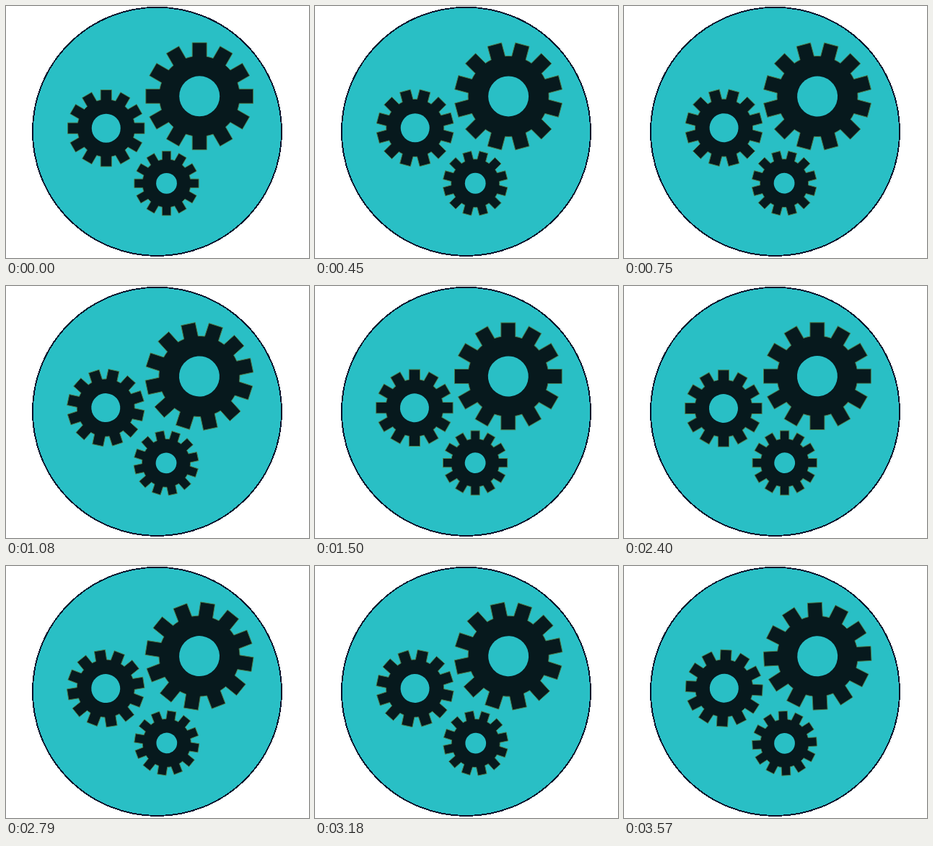
Write an HTML page that moves like this. It is 420 by 350 pixels and loops after 3.6 s.

```html
<!DOCTYPE html>
<html lang="en">
<head>
<meta charset="utf-8">
<title>Turning gears</title>
<style>
  html, body { margin: 0; width: 100%; height: 100%; overflow: hidden; background: #fff; }
  svg { display: block; width: 420px; height: 350px; }
</style>
</head>
<body>
<svg id="stage" viewBox="0 0 420 350" xmlns="http://www.w3.org/2000/svg">
  <circle cx="209.5" cy="174.4" r="172.6" fill="#29bfc5" stroke="#04102a" stroke-width="1.9" shape-rendering="crispEdges"/>
</svg>
<script>
const LOOP = 3600, STEP = 30, TEETH = 12;
const NS = "http://www.w3.org/2000/svg";
const stage = document.getElementById("stage");

// wob / phase: the wheel's centre circles slightly around its pivot
const gears = [
  { x: 268, y: 125.3, r: 74.4, root: 56, tooth: 20, hole: 28, dir: 1, wob: 0.2, phase: 0 },
  { x: 138.3, y: 169.6, r: 53.2, root: 40, tooth: 15.2, hole: 20, dir: -1, wob: 0.5, phase: 15 },
  { x: 222.4, y: 245.9, r: 44.6, root: 33.5, tooth: 12.2, hole: 14.4, dir: 1, wob: 0.4, phase: 75 }
];

const rad = deg => deg * Math.PI / 180;

function add(parent, name, attrs) {
  const el = document.createElementNS(NS, name);
  for (const key in attrs) el.setAttribute(key, attrs[key]);
  return parent.appendChild(el);
}

function outline({ r, root, tooth }) {
  const half = tooth / 2, base = Math.sqrt(root * root - half * half);
  const corners = [[-half, -base], [-half, -r], [half, -r], [half, -base]];
  let d = "";
  for (let i = 0; i < TEETH; i++) {
    const a = rad(i * 360 / TEETH), c = Math.cos(a), s = Math.sin(a);
    corners.forEach(([x, y], k) => {
      const cmd = k ? "L" : i ? `A${root} ${root} 0 0 1 ` : "M";
      d += `${cmd}${(x * c - y * s).toFixed(2)} ${(x * s + y * c).toFixed(2)}`;
    });
  }
  return d + `A${root} ${root} 0 0 1 ${-half} ${(-base).toFixed(2)}Z`;
}

for (const g of gears) {
  g.el = add(stage, "g", {});
  add(g.el, "path", { d: outline(g), fill: "#07191d", stroke: "#4e7a48", "stroke-width": 0.9 });
  add(g.el, "circle", { r: g.hole, fill: "#29bfc5" });
}

function draw(time) {
  const frame = Math.floor((time % LOOP) / STEP + 1e-6);
  const turn = frame * STEP / LOOP * 360;
  for (const g of gears) {
    const angle = g.dir * turn, a = rad(g.phase + angle);
    const x = g.x + g.wob * Math.cos(a), y = g.y + g.wob * Math.sin(a);
    g.el.setAttribute("transform", `translate(${x.toFixed(3)} ${y.toFixed(3)}) rotate(${angle})`);
  }
}

function tick() {
  draw(performance.now());
  requestAnimationFrame(tick);
}
draw(0);
requestAnimationFrame(tick);
</script>
</body>
</html>
```
